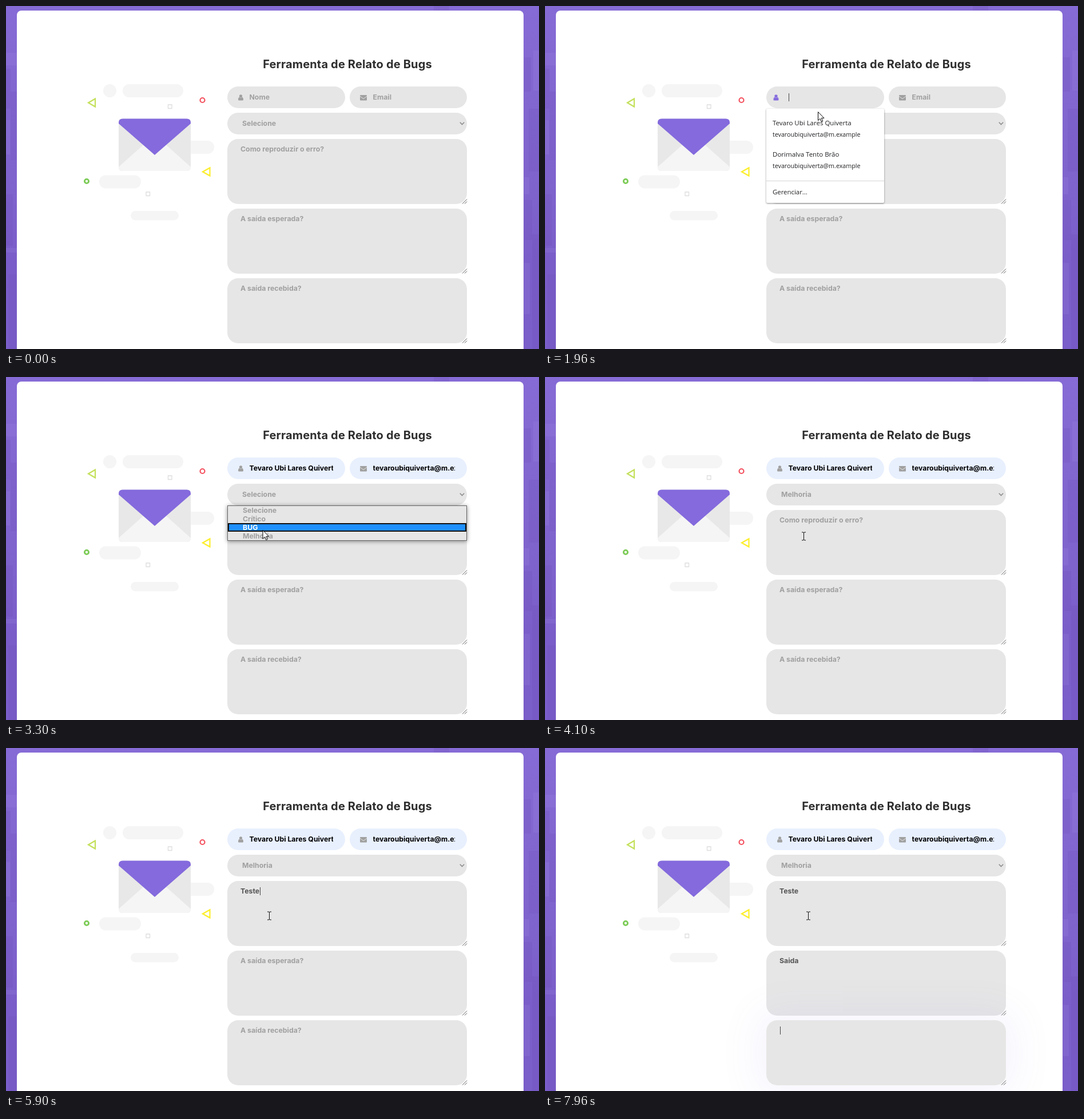
Animation, 932 px wide and 601 px high, one loop 8000 ms. Source, as an HTML page:

```html
<!DOCTYPE html>
<html lang="pt-BR">
<head>
<meta charset="utf-8">
<title>Relato de Bugs</title>
<style>
html, body { margin: 0; width: 100%; height: 100%; overflow: hidden; }
#stage {
  position: relative; width: 932px; height: 601px; overflow: hidden;
  background: linear-gradient(#866bd6, #8267d0 25%, #7f63cd 55%, #7a5dc8 75%, #7a5ec9);
  font: 700 12.3px/38px Inter, "Open Sans", sans-serif; color: #a0a0a0; white-space: nowrap;
}
#stage div, #stage svg, #stage span.at { position: absolute; }
svg { overflow: visible; }
.card { left: 19px; top: 8px; width: 886px; height: 640px; border-radius: 8px; background: #fff; }
h1 {
  position: absolute; left: 388px; top: 82px; width: 418px; margin: 0; text-align: center;
  font-size: 20px; line-height: 40px; letter-spacing: .008em; color: #2e2e2e;
}
.field { left: 387px; width: 419px; height: 38px; z-index: 1; }
.area { height: 114px; line-height: 36px; }
.half { width: 206px; }
.bg, .glow { inset: 0; border-radius: 19px; }
.bg { background: #e6e6e6; }
.glow { opacity: 0; }
.area .at { left: 23px; top: 0; }
.half .at { left: 38.5px; top: 0; }
.typed { color: #555; }
.filled { color: #000; width: 146px; overflow: hidden; opacity: 0; }
.caret {
  display: inline-block; width: 1px; height: 14px; margin-left: .5px;
  background: #444; vertical-align: -3px; opacity: 0;
}
.pop { z-index: 2; opacity: 0; }
#auto {
  left: 386.5px; top: 180px; width: 206.5px; height: 165px; background: #fff; border-radius: 2px;
  box-shadow: 0 1px 3px rgba(0,0,0,.45); color: #202124;
  font: 400 10.7px/20px "Open Sans", "Noto Sans", sans-serif;
}
#auto div { left: 11.5px; }
#auto b { font-weight: 500; font-size: 11.5px; }
#list {
  left: 387px; top: 225px; width: 419px; height: 62px; box-sizing: border-box;
  background: #e6e6e6; border: 1px solid #666; box-shadow: 0 1px 7px rgba(0,0,0,.45); line-height: 15px;
}
#list .at { left: 26px; }
#mark {
  left: 0; top: 0; width: 417px; height: 15px; box-sizing: border-box;
  background: #1e90ff; border: 2px solid #101010;
}
.mouse { left: 0; top: 0; z-index: 3; opacity: 0; }
</style>
</head>
<body>
<div id="stage">
  <svg width="932" height="601">
    <g fill="#6d50b8" opacity=".22">
      <path d="M748 0h27v8h-27zM0 110h8v70H0zM8 150h11v120H8zM0 330h12v90H0zM4 470h15v131H4zM906 90h12v60h-12zM914 180h18v110h-18zM906 340h14v70h-14zM920 400h12v201h-12z"/>
    </g>
    <g fill="#a48ee6" opacity=".16">
      <path d="M0 82h19v22H0zM0 200h7v60H0zM0 424h19v8H0zM922 78h10v70h-10zM906 300h9v30h-9zM906 450h10v90h-10z"/>
    </g>
  </svg>
  <div class="card"></div>
  <svg width="380" height="400">
    <g fill="#f5f5f5">
      <circle cx="181.5" cy="148.5" r="11.5"/>
      <rect x="204" y="137" width="106" height="23" rx="11.5"/>
      <rect x="300" y="236" width="64" height="23" rx="11.5"/>
      <rect x="163" y="296.5" width="73" height="23" rx="11.5"/>
      <rect x="218" y="359" width="84" height="16.5" rx="8.2"/>
    </g>
    <rect x="197" y="197.5" width="126" height="91.5" rx="6" fill="#e8e8e8"/>
    <path d="M197 282L254 231Q260 226 266 231L323 282Q323 289 316 289H204Q197 289 197 282Z" fill="#f5f5f5"/>
    <path d="M197 206V204Q197 197.5 204 197.5H316Q323 197.5 323 204V206L260 261Z" fill="#846add"/>
    <g fill="none" stroke-width="2.2">
      <path d="M144 169.5L156 162.5V176.5Z" stroke="#c3e05a"/>
      <path d="M344 290.500L356.500 283.500V297.500Z" stroke="#fcee2b"/>
      <circle cx="343.5" cy="165" r="4" stroke="#f4515f"/>
      <circle cx="141" cy="307" r="3.6" stroke="#7dcc58" stroke-width="2.9"/>
      <path d="M283.500 173h6.500v6.500h-6.500zM245 326h6.500v6.500h-6.500z" stroke="#dedede" stroke-width="1.3"/>
    </g>
  </svg>
  <h1>Ferramenta de Relato de Bugs</h1>

  <div class="field half" style="top:141px">
    <div class="glow" id="glow0"></div><div class="bg" id="bgName"></div>
    <svg id="user" width="9" height="11" style="left:19px;top:13.5px" fill="currentColor">
      <circle cx="4.5" cy="2.8" r="2.6"/>
      <path d="M2 4.800Q4.500 6.800 7 4.800Q9 5.500 9 9Q9 10.500 7.500 10.500H1.500Q0 10.500 0 9Q0 5.500 2 4.800Z"/>
    </svg>
    <span class="at" id="hintName">Nome</span>
    <span class="at"><i class="caret" id="caret0"></i></span>
    <span class="at filled" id="name">Tevaro Ubi Lares Quiverta</span>
  </div>
  <div class="field half" style="top:141px;left:600.5px;width:205.5px">
    <div class="bg" id="bgMail"></div>
    <svg width="12" height="10" style="left:18.5px;top:14.5px">
      <rect width="12" height="9.5" rx="1.2" fill="#a0a0a0"/>
      <path d="M0 2.300L6 6.500L12 2.300" fill="none" stroke="#e6e6e6"/>
    </svg>
    <span class="at" id="hintMail" style="left:41px">Email</span>
    <span class="at filled" id="mail" style="left:41px;width:143px">tevaroubiquiverta@m.example</span>
  </div>
  <div class="field" style="top:187px">
    <div class="bg"></div>
    <span class="at" id="choice0" style="left:26px">Selecione</span>
    <span class="at" id="choice1" style="left:26px">Melhoria</span>
    <svg width="10" height="8" style="left:406px;top:15px">
      <path d="M.8 1.800L4.500 5.500L8.200 1.800" fill="none" stroke="#8c8c8c" stroke-width="1.6"/>
    </svg>
  </div>

  <div class="pop" id="auto">
    <div style="top:15px"><b>Tevaro Ubi Lares Quiverta</b></div>
    <div style="top:35px">tevaroubiquiverta@m.example</div>
    <div style="top:70px"><b>Dorimalva Tento Brão</b></div>
    <div style="top:90px">tevaroubiquiverta@m.example</div>
    <div style="top:126px;left:0;width:100%;height:1px;background:#d5d5d5"></div>
    <div style="top:136px;font-size:11.4px">Gerenciar...</div>
  </div>
  <div class="pop" id="list"><div id="mark"></div></div>

  <svg class="mouse" id="arrow" width="12" height="19">
    <path d="M.5.5V15.500L4 12.300L6.300 17.500L8.700 16.500L6.400 11.300H11Z" fill="#fff" stroke="#000"/>
  </svg>
  <svg class="mouse" id="beam" width="8" height="16">
    <path d="M-3-7H-1Q.5-7 .5-5.500Q.5-7 2-7H4M.5-6V6M-3 7H-1Q.5 7 .5 5.500Q.5 7 2 7H4" fill="none" stroke="#111"/>
  </svg>
</div>
<script>
const LOOP = 8000;
const $ = id => document.getElementById(id);
const stage = $('stage');
const anims = [];

function play(el, frames, opts) {
  const a = el.animate(frames, opts);
  a.pause();
  anims.push(a);
}

// table: [time, value] pairs; the last value holds to the end
function track(el, prop, table, easing = 'step-end') {
  const all = [...table, [LOOP, table[table.length - 1][1]]];
  play(el, all.map(([t, v]) => ({ offset: t / LOOP, [prop]: v, easing })), { duration: LOOP });
}

// switches visibility at each given time
function toggle(el, on, ...times) {
  track(el, 'opacity', [[0, +on], ...times.map((t, i) => [t, (i + 1 + on) % 2])]);
}

function glow(el, start) {
  const color = 'rgba(132,106,221,.8)';
  play(el, [
    { boxShadow: `0 0 0 0 ${color}`, opacity: 1 },
    { boxShadow: `0 0 70px 25px ${color}`, opacity: 0 }
  ], { duration: 500, delay: start, easing: 'ease-in-out' });
}

// text areas
const areas = [
  { top: 233, hint: 'Como reproduzir o erro?', focus: 4400, text: 'Teste',
    keys: [5500, 5560, 5700, 5760, 5900], caret: [4400, 4880, 5360, 6160] },
  { top: 355, hint: 'A saída esperada?', focus: 6160, text: 'Saida',
    keys: [6760, 6900, 7100, 7200, 7300], caret: [6160, 7560] },
  { top: 477, hint: 'A saída recebida?', focus: 7560, text: '', keys: [], caret: [7560] }
];
for (const a of areas) {
  const box = document.createElement('div');
  box.className = 'field area';
  box.style.top = a.top + 'px';
  box.innerHTML = `<div class="glow"></div><div class="bg"></div>
    <span class="at hint">${a.hint}</span>
    <span class="at typed"><span class="text"></span><i class="caret"></i></span>
    <svg width="10" height="10" style="left:409.5px;top:104px">
      <path d="M1 9.500L9 1.500M5 9.500L9 5.500" stroke="#555" fill="none"/></svg>`;
  stage.insertBefore(box, $('auto'));
  a.out = box.querySelector('.text');
  toggle(box.querySelector('.hint'), true, a.focus);
  toggle(box.querySelector('.caret'), false, ...a.caret);
  glow(box.querySelector('.glow'), a.focus);
}

// name and mail, with the suggestion list
const CLICK = 1480, FILL = 2170;
glow($('glow0'), CLICK);
toggle($('hintName'), true, CLICK);
toggle($('caret0'), false, CLICK, 2020);
toggle($('auto'), false, 1700, FILL);
toggle($('hintMail'), true, FILL);
for (const id of ['name', 'mail']) toggle($(id), false, FILL);
for (const id of ['bgName', 'bgMail'])
  track($(id), 'backgroundColor', [[0, '#e6e6e6'], [FILL, '#e8f0fe']]);
const shift = (prop, off, on) => track($('user'), prop,
  [[0, off], [CLICK, off], [CLICK + 400, on], [2630, on], [3030, off]], 'ease');
shift('transform', 'translateX(0)', 'translateX(-6.5px)');
shift('color', '#a0a0a0', '#846add');

// severity list
const OPEN = 2630, PICK = 3700, ROW = 15;
const hover = [OPEN, 2930, 3120, 3530, LOOP];
['Selecione', 'Crítico', 'BUG', 'Melhoria'].forEach((label, i) => {
  const row = document.createElement('span');
  row.className = 'at';
  row.textContent = label;
  row.style.top = i * ROW + 'px';
  $('list').append(row);
  track(row, 'color', [[0, '#a0a0a0'], [hover[i], '#fff'], ...(i < 3 ? [[hover[i + 1], '#a0a0a0']] : [])]);
});
track($('mark'), 'transform',
  [0, ...hover.slice(1, 4)].map((t, i) => [t, `translateY(${i * ROW}px)`]));
toggle($('list'), false, OPEN, PICK);
toggle($('choice0'), true, PICK);
toggle($('choice1'), false, PICK);

// pointer
const path = [
  [0, 267, 379], [830, 267, 379], [1030, 318, 332], [1230, 391, 258], [1370, 440, 206],
  [1430, 466, 168], [1480, 475, 160], [1700, 475, 160], [1830, 477, 180], [1960, 477, 185],
  [2100, 476, 202], [2630, 476, 202], [2900, 466, 226], [3120, 455, 254], [3300, 448.5, 268],
  [3500, 448.5, 268], [3560, 448.5, 283], [3700, 448.5, 283], [3900, 452, 279],
  [4180, 452, 279], [4380, 460, 294]
].map(([t, x, y]) => [t, `translate(${x}px,${y}px)`]);
track($('arrow'), 'transform', path, 'linear');
track($('beam'), 'transform', path, 'linear');
toggle($('arrow'), false, 500, 1230, 1330, 1430, 1740, PICK);
toggle($('beam'), false, 1230, 1330, 1430, 1740, PICK);

const begin = performance.now();
function frame() {
  const t = (performance.now() - begin) % LOOP;
  for (const a of anims) a.currentTime = t;
  for (const a of areas) {
    const now = a.text.slice(0, a.keys.filter(k => k <= t).length);
    if (a.out.textContent !== now) a.out.textContent = now;
  }
  requestAnimationFrame(frame);
}
frame();
</script>
</body>
</html>
```
